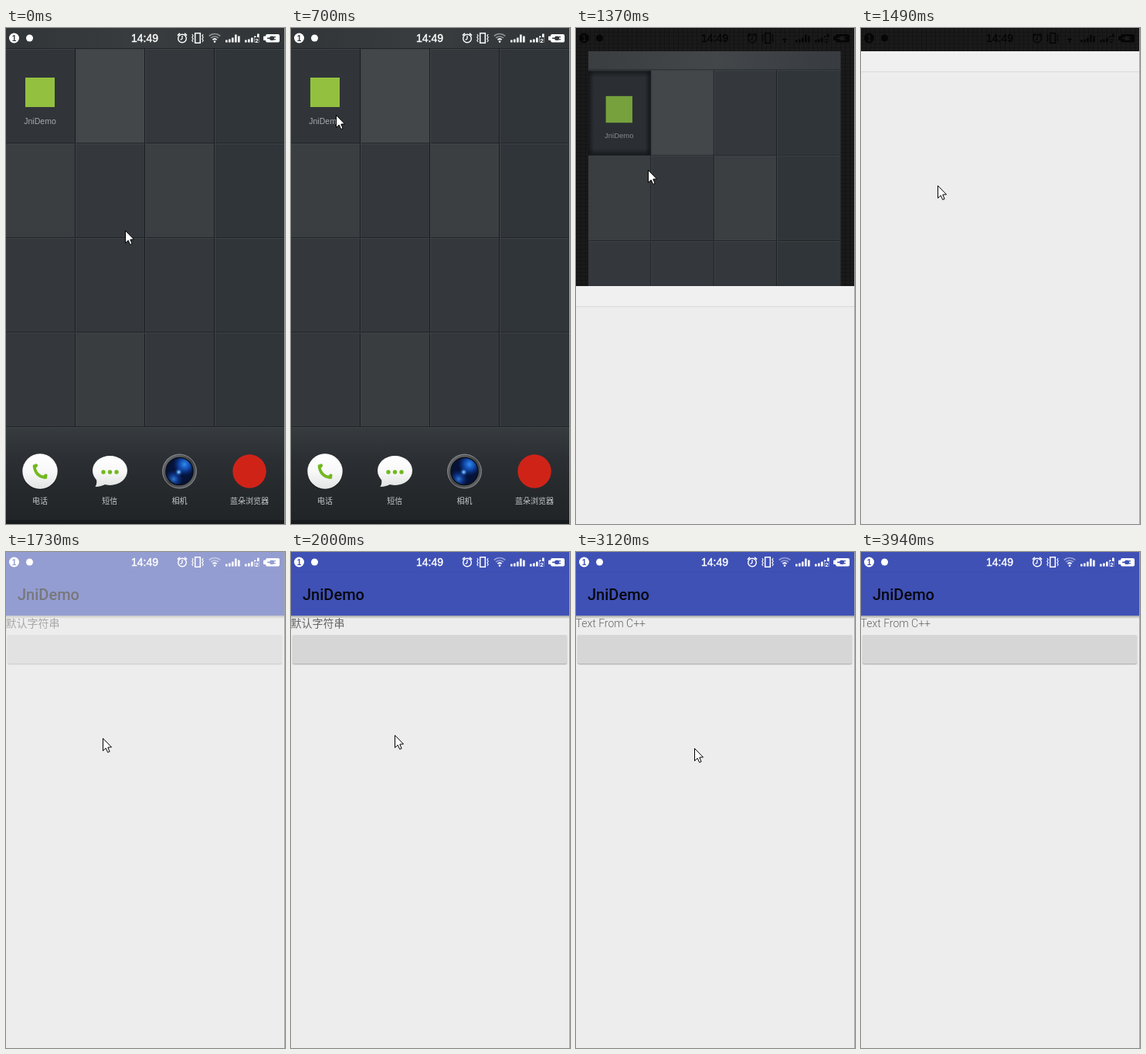
An HTML page with a canvas for the animation above (4.75 s loop, 361 by 640 pixels).

```html
<!DOCTYPE html>
<html lang="zh">
<head>
<meta charset="utf-8">
<title>JniDemo</title>
<style>
html, body { margin: 0; width: 100%; height: 100%; overflow: hidden; background: #2f3438; }
canvas { display: block; width: 361px; height: 640px; }
</style>
</head>
<body>
<canvas id="stage" width="361" height="640"></canvas>
<script>
const c = document.getElementById('stage').getContext('2d');
const LOOP = 4750, W = 361, H = 640;
const CJK = '"Noto Sans CJK SC", "Noto Sans CJK", sans-serif';
const ARIAL = '"Liberation Sans", sans-serif';

// time, x, y of the pointer; it jumps from one stop to the next
const POINTER = [
  [0, 154, 261], [430, 88, 208], [580, 70, 150], [700, 58, 112], [820, 54, 98],
  [1220, 78, 147], [1370, 93, 183], [1490, 99, 203], [1610, 112, 221], [1730, 125, 240],
  [1850, 128, 243], [2000, 134, 236], [2150, 149, 215], [2300, 148, 175], [2420, 146, 145],
  [2570, 144, 138], [2970, 153, 253], [3510, 172, 263], [3660, 235, 420], [3790, 296, 579]
];
// tones of the wallpaper tiles that stand out, by column and row
const TILES = { '10': '#43474a', '01': '#3a3e41', '21': '#3b3f42', '13': '#393d40', '00': '#313539' };

function rect(x, y, w, h, fill) {
  c.fillStyle = fill;
  c.fillRect(x, y, w, h);
}

function disc(x, y, r, fill) {
  c.fillStyle = fill;
  c.beginPath();
  c.arc(x, y, r, 0, 7);
  c.fill();
}

function ring(x, y, r, width, stroke, from = 0, to = 7) {
  c.strokeStyle = stroke;
  c.lineWidth = width;
  c.beginPath();
  c.arc(x, y, r, from, to);
  c.stroke();
}

function line(width, stroke, ...p) {
  c.strokeStyle = stroke;
  c.lineWidth = width;
  c.beginPath();
  c.moveTo(p[0], p[1]);
  for (let i = 2; i < p.length; i += 2) c.lineTo(p[i], p[i + 1]);
  c.stroke();
}

function round(x, y, w, h, r, fill) {
  c.fillStyle = fill;
  c.beginPath();
  c.roundRect(x, y, w, h, r);
  c.fill();
}

function text(s, x, y, font, fill, align = 'left') {
  c.font = font;
  c.textAlign = align;
  c.fillStyle = fill;
  c.fillText(s, x, y);
}

function addStops(g, colors) {
  colors.forEach((color, i) => g.addColorStop(i / (colors.length - 1), color));
  return g;
}

function fade(x0, y0, x1, y1, ...colors) {
  return addStops(c.createLinearGradient(x0, y0, x1, y1), colors);
}

function glow(x, y, r, ...colors) {
  return addStops(c.createRadialGradient(x, y, 0, x, y, r), colors);
}

function signal(x, ink, heights) {
  heights.forEach((h, i) => rect(x + i * 4, 18.5 - h, 2.6, h, ink));
}

function status(ink, back, dim) {
  disc(10.5, 13, 6.5, ink);
  text('1', 10.5, 16.6, 'bold 10px ' + ARIAL, back, 'center');
  disc(30.5, 13, 4.5, ink);

  text('14:49', 179.5, 18, '14px ' + ARIAL, ink, 'center');
  c.strokeStyle = ink;
  c.lineWidth = 0.4;
  c.strokeText('14:49', 179.5, 18);

  ring(228, 13.5, 5.3, 1.4, ink);
  line(1.3, ink, 228, 10, 228, 14, 225.6, 15.4);
  line(1.6, ink, 222, 9.6, 225, 6.8);
  line(1.6, ink, 231, 6.8, 234, 9.6);

  c.lineWidth = 1.5;
  c.strokeRect(244.7, 6.7, 6.6, 12.6);
  for (const s of [-1, 1]) {
    const x = 248 + s * 6.2;
    line(1.1, ink, x + s, 8, x - s * 0.4, 10, x + s, 12, x - s * 0.4, 14, x + s, 16, x - s * 0.4, 18);
  }

  [[10.5, dim], [7, dim], [3.8, 1]].forEach(([r, a]) => {
    c.globalAlpha = a;
    ring(270, 18, r, 1.7, ink, -2.33, -0.81);
  });
  c.globalAlpha = 1;
  disc(270, 17.6, 1.3, ink);

  signal(284, ink, [3, 4, 6, 10, 8]);
  signal(309, ink, [3, 4, 6, 8, 11]);
  rect(321.5, 12, 6, 7, back);
  text('2', 324.5, 18.6, 'bold 8px ' + ARIAL, ink, 'center');

  round(336, 8, 18, 10.5, 2, ink);
  round(333, 10.5, 4, 5.5, 1, ink);
  round(341, 10.5, 6, 5.5, 2.5, back);
  rect(338, 12.5, 4, 1.5, back);
  rect(346, 11, 3, 1.2, back);
  rect(346, 14.2, 3, 1.2, back);
}

function pressedTile() {
  const dark = 'rgba(14,16,18,.75)', clear = 'rgba(14,16,18,0)';
  rect(0, 27, 89, 122, '#2b2f33');
  rect(0, 27, 89, 10, fade(0, 27, 0, 37, dark, clear));
  rect(0, 139, 89, 10, fade(0, 149, 0, 139, dark, clear));
  rect(0, 27, 8, 122, fade(0, 0, 8, 0, dark, clear));
  rect(81, 27, 8, 122, fade(89, 0, 81, 0, dark, clear));
}

function wallpaper(pressed) {
  rect(0, 0, W, H, '#33373b');
  rect(0, 0, W, 27, fade(0, 0, W, 0, '#3a3e41', '#43474a', '#383c40'));
  for (let row = 0; row < 4; row++) {
    for (let col = 0; col < 4; col++) {
      rect(col * 90, 27 + row * 122, 91, 122, TILES['' + col + row] || (col === 3 ? '#30353a' : '#34383c'));
    }
  }
  if (pressed) pressedTile();
  for (let i = 0; i < 5; i++) {
    const y = 26 + i * 122;
    rect(0, y, W, 1, '#202427');
    rect(0, y + 1, W, 1, '#3f4447');
    if (i > 0 && i < 4) {
      rect(i * 90 - 1, 27, 1, 489, '#1a1d20');
      rect(i * 90, 27, 1, 489, '#3f4447');
    }
  }
  // launcher entry
  rect(25, 64, 38, 38, pressed ? '#76a13c' : '#93c13f');
  text('JniDemo', 44, 124, '10.5px ' + ARIAL, pressed ? '#85898b' : '#a6aaac', 'center');
}

function phoneIcon(green) {
  disc(44, 573.5, 22.8, 'rgba(0,0,0,.35)');
  disc(44, 572, 22.7, fade(0, 550, 0, 595, '#ffffff', '#f8f8f8', '#e2e3e3'));
  c.lineCap = 'round';
  c.strokeStyle = green;
  c.lineWidth = 3.6;
  c.beginPath();
  c.moveTo(36.5, 565);
  c.quadraticCurveTo(38, 579, 51.5, 580);
  c.stroke();
  line(4.2, green, 37, 566.5, 39, 564.5);
  line(4.2, green, 49.5, 579.5, 51.5, 577.5);
  c.lineCap = 'butt';
}

function chatIcon(green) {
  c.fillStyle = fade(0, 551, 0, 593, '#ffffff', '#f9f9f9', '#e0e1e1');
  c.beginPath();
  c.ellipse(134.5, 571, 22.5, 19, 0, 0, 7);
  c.fill();
  c.beginPath();
  c.moveTo(116, 579);
  c.quadraticCurveTo(119, 587, 115.5, 592);
  c.quadraticCurveTo(123, 592, 130, 588);
  c.fill();
  [126, 134.5, 143].forEach(x => disc(x, 573, 2.7, green));
}

function cameraIcon() {
  disc(224.5, 572, 22.5, fade(205, 552, 245, 594, '#6d7072', '#3f4143', '#696b6d'));
  ring(224.5, 572, 21.8, 1, '#85888a');
  disc(224.5, 572, 18.3, '#0b0d14');
  c.save();
  c.beginPath();
  c.arc(224.5, 572, 17, 0, 7);
  c.clip();
  rect(205, 552, 40, 40, '#061338');
  rect(205, 552, 40, 40, glow(231, 563, 15, 'rgba(50,150,255,.95)', 'rgba(20,90,210,.7)', 'rgba(10,50,150,0)'));
  rect(205, 552, 40, 40, glow(217, 582, 12, 'rgba(60,150,245,.8)', 'rgba(20,80,200,.5)', 'rgba(10,50,150,0)'));
  rect(205, 552, 40, 40, glow(223.5, 573, 5, '#c4ecff', 'rgba(60,160,255,.5)', 'rgba(20,80,200,0)'));
  c.restore();
}

function dock() {
  rect(0, 516, W, 124, fade(0, 516, 0, 640, '#363b3e', '#2b2f33', '#25292c', '#202427'));
  rect(0, 635, W, 5, 'rgba(0,0,0,.25)');
  phoneIcon('#72b81e');
  chatIcon('#72b81e');
  cameraIcon();
  disc(315, 572, 21.7, '#d02318');
  ['电话', '短信', '相机', '蓝朵浏览器'].forEach((s, i) =>
    text(s, 44 + i * 90.3, 614, '10px ' + CJK, '#c6c9ca', 'center'));
}

function home(pressed) {
  wallpaper(pressed);
  dock();
  rect(0, 0, W, 26, 'rgba(24,28,31,.25)');
  status('#ffffff', '#363a3d', 0.45);
}

function backdrop() {
  rect(0, 0, W, H, '#1a1a1a');
  for (let i = 0; i < W; i += 6) rect(i, 0, 1, H, 'rgba(0,0,0,.2)');
  for (let i = 0; i < H; i += 5) rect(0, i, W, 1, 'rgba(0,0,0,.2)');
}

function blankWindow(y) {
  rect(0, y, W, H, '#ededed');
  rect(0, y, W, 26, '#f0f0f0');
  rect(0, y + 26, W, 1, '#d9d9d9');
}

function opening(y, showHome) {
  backdrop();
  if (showHome) {
    c.save();
    c.translate(16, 30);
    c.scale(0.904, 0.904);
    wallpaper(true);
    c.restore();
  }
  status('#060606', '#1a1a1a', 0);
  blankWindow(y);
}

// ripple: radius of the touch highlight, 0 when idle
function button(ripple) {
  c.save();
  c.shadowColor = ripple ? 'rgba(0,0,0,.4)' : 'rgba(0,0,0,.3)';
  c.shadowBlur = ripple ? 4 : 1.5;
  c.shadowOffsetY = ripple ? 2 : 1;
  round(2, 107, 355, 37, 2, '#d6d6d6');
  c.restore();
  if (!ripple) return;
  c.save();
  c.beginPath();
  c.roundRect(2, 107, 355, 37, 2);
  c.clip();
  disc(144, 138, ripple, 'rgba(0,0,0,.12)');
  c.restore();
}

function app(alpha, label, font, ripple) {
  rect(0, 0, W, H, '#ededed');
  rect(0, 82, W, 4, fade(0, 82, 0, 86, 'rgba(0,0,0,.32)', 'rgba(0,0,0,0)'));
  rect(0, 0, W, 82, '#3f51b5');
  rect(0, 25, W, 1, '#3d4eaf');
  text('JniDemo', 15, 62, '500 20px Roboto, sans-serif', '#07080f');
  text(label, -0.5, 97, font, '#666666');
  button(ripple);
  // the whole window fades in from its blank colour
  rect(0, 0, W, H, `rgba(237,237,237,${1 - alpha})`);
  status('#ffffff', alpha < 1 ? '#969fd4' : '#3f51b5', 0.45);
}

function pointer(x, y) {
  c.beginPath();
  [[0, 0], [0, 16], [3.7, 12.6], [6.2, 18], [8.6, 17], [6.3, 11.6], [11, 11.3]]
    .forEach(([dx, dy]) => c.lineTo(x + 0.5 + dx, y + 0.5 + dy));
  c.closePath();
  c.fillStyle = '#fff';
  c.fill();
  c.strokeStyle = '#000';
  c.lineWidth = 1;
  c.stroke();
}

function draw(t) {
  if (t < 1370) home(t >= 1090);
  else if (t < 1490) opening(333, true);
  else if (t < 1610) opening(30, false);
  else {
    const alpha = t < 1730 ? 0.15 : t < 1850 ? 0.51 : 1;
    const ripple = t < 2850 || t >= 3120 ? 0 : t < 2970 ? 110 : 300;
    if (t < 3120) app(alpha, '默认字符串', '14px ' + CJK, ripple);
    else app(alpha, 'Text From C++', '300 14px Roboto, sans-serif', ripple);
  }
  if (t < 3940) {
    const [, x, y] = POINTER.findLast(p => p[0] <= t);
    pointer(x, y);
  }
  rect(360, 0, 1, H, '#a6a6a6');
}

const start = performance.now();
function tick() {
  draw((performance.now() - start) % LOOP);
  requestAnimationFrame(tick);
}
tick();
</script>
</body>
</html>
```
